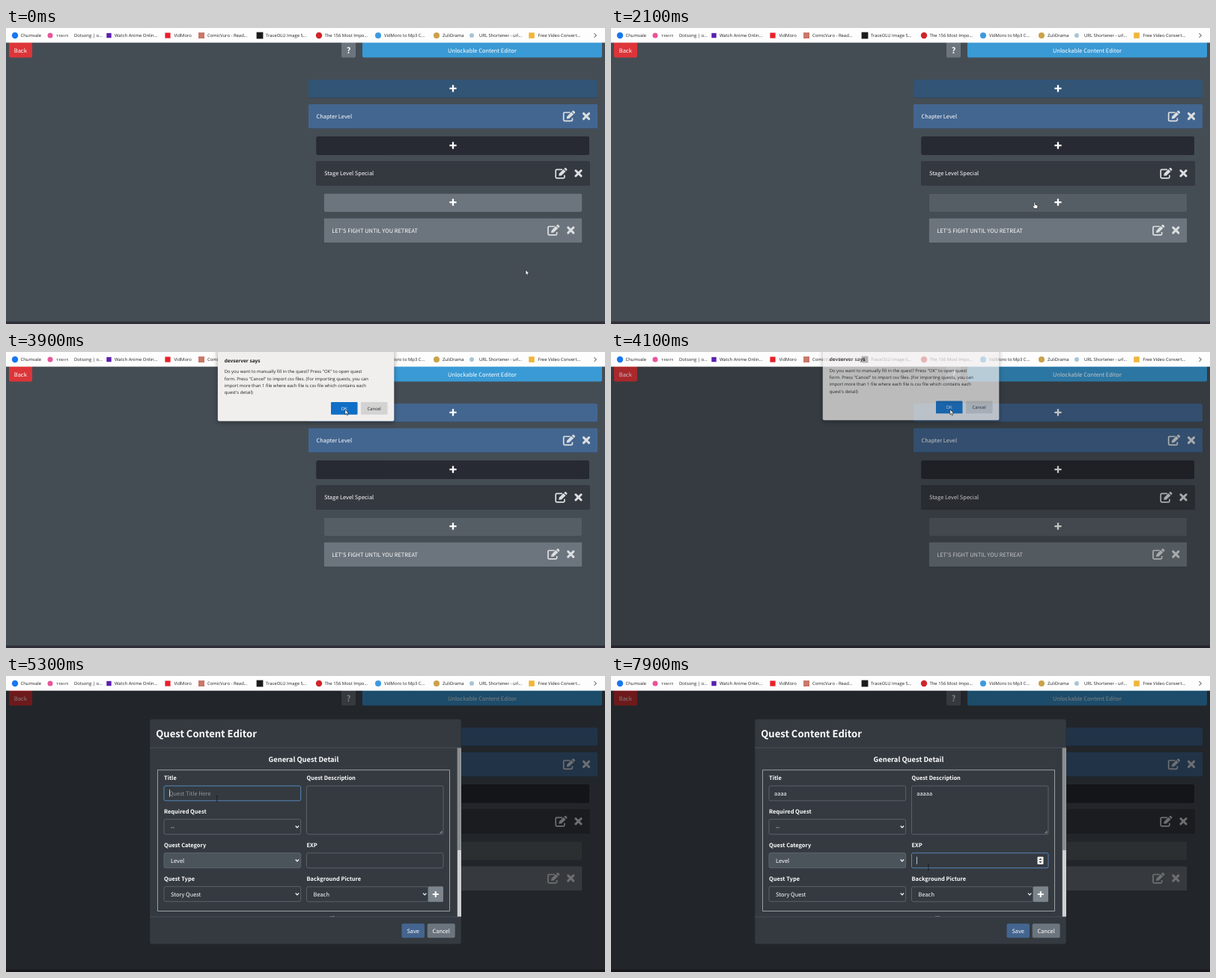
An HTML page for the animation above (8000 ms loop, 800x396 px).

```html
<!DOCTYPE html>
<html lang="en">
<head>
<meta charset="utf-8">
<title>Quest editor</title>
<style>
  html, body { margin: 0; width: 100%; height: 100%; overflow: hidden; background: #454d54; }
  svg { display: block; width: 100vw; height: 100vh; }
  text { font-family: "Noto Sans CJK JP", "Noto Sans CJK SC", sans-serif; fill: #fff; white-space: pre; text-rendering: geometricPrecision; }
  .ui text { font-family: "Open Sans", "Noto Sans", sans-serif; fill: #222; }
  .ui text.light { fill: #fff; }
  .b { font-weight: 700; }
  .mid { text-anchor: middle; }
  .hint { fill: #8e959b; }
  .card { filter: drop-shadow(0 .5px .7px rgba(0, 0, 0, .45)); }
  .field { stroke: #646b72; stroke-width: .8; }
  .line { fill: none; stroke: #fff; }
  #dialog { filter: drop-shadow(0 2px 3px rgba(0, 0, 0, .4)); }
  #cursor path { fill: #fff; stroke: #111; stroke-width: .6; stroke-linejoin: round; }
</style>
</head>
<body>
<svg id="stage" viewBox="0 0 800 396" preserveAspectRatio="none"></svg>
<script>
const LOOP = 8000, STEP = 100, BASE = 7.46;
const PANEL = '#343a40', GRAY = '#6c757d', BLUE = '#436690';

const box = (x, y, x2, y2, fill, attrs = '') =>
  `<rect x="${x}" y="${y}" width="${x2 - x}" height="${y2 - y}" fill="${fill}" ${attrs}/>`;
const text = (x, y, str, size = BASE, cls = '', attrs = '') =>
  `<text x="${x}" y="${y}" font-size="${size}" class="${cls}" ${attrs}>${str}</text>`;
const path = (d, attrs) => `<path d="${d}" ${attrs}/>`;
const at = (x, y, content) => `<g transform="translate(${x} ${y})">${content}</g>`;

// Page
const plus = (x, y, r = 4.6) =>
  path(`M${x - r} ${y}h${2 * r}M${x} ${y - r}v${2 * r}`, `class="line" stroke-width="${r / 2}"`);

const editIcon = (x, y) => at(x, y,
  path('M1.5-5H-6q-1.3 0-1.3 1.3V5.1q0 1.3 1.3 1.3H3.1q1.3 0 1.3-1.3V2.4', 'fill="none" stroke="#dcdfe1" stroke-width="1.7"') +
  path('M-3.2 3.4L-2.8.4 3-5.4 6-2.4.2 3zM3.7-6.1L4.9-7.2Q5.6-7.7 6.3-7.2L7.8-5.7Q8.4-5 7.8-4.3L6.7-3.1z', 'fill="#dcdfe1"'));

const crossIcon = (x, y) => at(x, y,
  path('M-3.6-3.6L3.6 3.6M3.6-3.6L-3.6 3.6', 'stroke="#dcdfe1" stroke-width="2.9" stroke-linecap="round"'));

const addButton = (id, x, y, x2, fill) =>
  box(x, y, x2, y + 24.5, fill, `id="${id}" rx="2" class="card"`) + plus(597, y + 11.8);

const header = (x, y, x2, fill, label) =>
  box(x, y, x2, y + 32.5, fill, 'rx="1" class="card"') + text(x + 10.5, y + 19, label) +
  editIcon(x2 - 38, y + 16) + crossIcon(x2 - 15, y + 16);

const page =
  box(0, 0, 800, 396, '#454d54') + box(0, 392.7, 800, 396, '#302f38') +
  box(4, 18, 35, 39.5, '#dd3539', 'rx="2"') + text(19.3, 33, 'Back', BASE, 'mid') +
  box(448, 18, 467, 39.5, GRAY, 'rx="2"') + text(457.6, 34.2, '?', 11, 'mid b') +
  box(476, 18, 796, 39.5, '#3a9ad5', 'rx="2"') + text(636, 33, 'Unlockable Content Editor', BASE, 'mid') +
  addButton('addChapter', 404, 69, 790, BLUE) +
  header(404, 102, 790, BLUE, 'Chapter Level') +
  addButton('addStage', 414.5, 145.3, 779, '#272a32') +
  header(414.5, 178.4, 779.5, '#34383f', 'Stage Level Special') +
  addButton('addQuest', 424.7, 221.4, 769.3, GRAY) +
  header(424.7, 254.5, 769.3, GRAY, "LET'S FIGHT UNTIL YOU RETREAT");

// Quest form
const field = (id, x, y, x2, y2, fill = PANEL) =>
  box(x, y, x2, y2, fill, `id="${id}" class="field" rx="2"`);
const label = (x, y, str) => text(x, y, str, BASE, 'b');
const select = (id, x, y, x2, value, fill) =>
  field(id, x, y, x2, y + 20, fill) + text(x + 9, y + 13, value) +
  path(`M${x2 - 7} ${y + 8.8}l2.2 2.3 2.2-2.3`, 'class="line" stroke-width="1.2"');

const L = 211, R = 401.5;
const modal =
  box(192, 57.7, 608, 358.8, PANEL, 'rx="3" stroke="#262a2e" stroke-width=".6"') +
  text(200.3, 81.6, 'Quest Content Editor', 13.06, 'b') +
  '<clipPath id="scroll"><rect x="192" y="96" width="416" height="226"/></clipPath><g clip-path="url(#scroll)">' +
  text(397.5, 114.8, 'General Quest Detail', 9.33, 'b mid') +
  box(202.6, 125.8, 592.5, 314.4, 'none', 'stroke="#b4b7ba" stroke-width=".8"') +
  label(L, 139.4, 'Title') + field('title', L, 147, 393.7, 166.8) +
  text(218, 159.7, 'Quest Title Here', BASE, 'hint', 'id="hint"') + text(218, 159.7, '', BASE, '', 'id="titleText"') +
  label(L, 184.4, 'Required Quest') + select('required', L, 191.7, 393.7, '--') +
  label(L, 229.4, 'Quest Category') + select('category', L, 236.7, 393.7, 'Level', '#4c545b') +
  label(L, 274.4, 'Quest Type') + select('type', L, 281.7, 393.7, 'Story Quest') +
  label(R, 139.4, 'Quest Description') + field('desc', R, 147, 584, 211.8) +
  text(408.2, 159.7, '', BASE, '', 'id="descText"') +
  path('M579.5 210.3l3-3M581.3 210.5l1.3-1.3', 'class="line" stroke-width=".6"') +
  label(R, 229.4, 'EXP') + field('exp', R, 236.8, 584, 256.8) +
  '<g id="spinner">' + box(569.5, 241.8, 577.5, 252, '#f0f0f0', 'rx="1"') +
  path('M571.5 246l2-2.2 2 2.2zM571.5 248l2 2.2 2-2.2z', 'fill="#444"') + '</g>' +
  label(R, 274.4, 'Background Picture') + select('picture', R, 281.9, 564, 'Beach') +
  box(563.8, 281.6, 584, 302.2, '#7d858c', 'rx="1.5"') + plus(573.8, 291.9, 4) +
  text(397.5, 328.6, 'Quest Item Payoff', 9.33, 'b mid') +
  box(602.8, 96, 608, 322, '#cfd0d1') + box(603, 96, 607.8, 233, '#8b8e90') + '</g>' +
  path('M192 96H608M192 322.2H608', 'class="line" style="stroke:#555c63" stroke-width=".6"') +
  box(528.5, 331.2, 559, 350.3, '#44658f', 'rx="2"') + text(543.7, 343.6, 'Save', BASE, 'mid') +
  box(562.7, 331.2, 599.7, 350.3, GRAY, 'rx="2"') + text(581.2, 343.6, 'Cancel', BASE, 'mid') +
  box(0, 0, .7, 10, '#fff', 'id="caret"');

// Bookmarks: icon x, half size, round?, colour, label x, label
const bookmarks = [
  [12, 4.2, 1, '#1877f2', 19.5, 'Chumvale'],
  [59, 3.5, 1, '#e8559a', 67.3, 'รายการ'],
  [137.5, 3.2, 0, '#5a1fb0', 145, 'Watch Anime Onlin...'],
  [216, 3.6, 0, '#e8202a', 224.5, 'VidMoro'],
  [261, 4, 0, '#c9786a', 269, 'ComicVuro - Read...'],
  [339, 4.4, 0, '#1b1b1b', 347, 'TraceOLU Image S...'],
  [418, 4.2, 1, '#d2232a', 425.5, 'The 156 Most Impo...'],
  [497, 4, 1, '#3b9ae1', 505, 'VidMoro to Mp3 C...'],
  [575, 4, 1, '#c9a24a', 583, 'ZuliDrama'],
  [622, 3, 1, '#a9c5d6', 632, 'URL Shortener - url...'],
  [702, 3.8, 0, '#f0b63c', 710.5, 'Free Video Convert...']
];
const bar = box(0, 0, 800, 19.6, '#fdfdfd') +
  bookmarks.map(([x, r, round, fill, tx, str]) =>
    box(x - r, 10 - r, x + r, 10 + r, fill, `rx="${round ? r : 0}"`) + text(tx, 12.4, str, 5.9)).join('') +
  text(91, 12.4, 'Dotsong | o...', 5.9) +
  path('M785.6 7.2l2.8 2.8-2.8 2.8', 'class="line" style="stroke:#222" stroke-width=".9"');

const message = [
  'Do you want to manually fill in the quest? Press "OK" to open quest',
  'form. Press "Cancel" to import csv files. (For importing quests, you can',
  'import more than 1 file where each file is csv file which contains each',
  "quest's detail)"
];
const dialog = box(282.8, -10, 518.3, 92.6, '#f1efee', 'rx="2"') +
  text(291.7, 13.8, 'devserver says', 6.5, 'b') +
  message.map((str, i) => text(291.7, 28.2 + i * 9.35, str, 5.9)).join('') +
  box(434, 67, 469.5, 83.8, '#0f6fc6', 'rx="1.2"') + text(451.5, 77.6, 'OK', 5.9, 'mid light') +
  box(474, 67, 509.5, 83.8, '#d3d3d3', 'rx="1.2"') + text(491.7, 77.6, 'Cancel', 5.9, 'mid');

const cursor =
  path('M0 0V7L1.6 5.5 2.7 8 3.8 7.5 2.7 5.1H4.9z', 'id="arrow"') +
  path('M-.9.6Q0-.6.9.6V3.3L3.2 3.9Q4.3 4.2 4.2 5.3L3.6 8.6H-.7L-2.8 5.2Q-2.4 4.1-1.4 4.9L-.9 5.4z', 'id="hand"') +
  path('M-1.1-3.6H1.1M0-3.6V3.6M-1.1 3.6H1.1', 'id="beam"');

const stage = document.getElementById('stage');
stage.innerHTML = page + box(0, 19.6, 800, 396, '#000', 'id="backdrop"') +
  `<g id="modal">${modal}</g><g class="ui">${bar}<g id="dialog">${dialog}</g></g><g id="cursor">${cursor}</g>`;

const parts = {};
stage.querySelectorAll('[id]').forEach(el => parts[el.id] = el);

// Pointer stops: time, x, y
const stops = [
  [800, 694, 323.5], [1200, 441.8, 231], [1700, 565.8, 233], [3000, 565.8, 233],
  [3700, 452.8, 76.8], [4500, 452.8, 76.8], [5100, 281.7, 164], [6000, 281.7, 164],
  [6400, 440, 170], [7100, 440, 170], [7500, 424, 255.5]
];
const ramp = (t, from, to) => Math.min(1, Math.max(0, (t - from) / (to - from)));

function pointer(t) {
  let [, x, y] = stops[0];
  for (let i = 1; i < stops.length; i++) {
    const k = ramp(t, stops[i - 1][0], stops[i][0]), s = k * k * (3 - 2 * k);
    x += (stops[i][1] - stops[i - 1][1]) * s;
    y += (stops[i][2] - stops[i - 1][2]) * s;
  }
  return [x, y];
}

const show = (el, on) => el.style.display = on ? '' : 'none';
const move = (el, x, y) => el.setAttribute('transform', `translate(${x} ${y})`);
const fade = (el, a) => { el.style.opacity = a; show(el, a > 0); };
const typed = (t, start, max) => Math.min(max, Math.max(0, Math.floor((t - start) / 100) + 1));

function drawForm(t) {
  const titleCount = typed(t, 5500, 4), descCount = typed(t, 6600, 5);
  parts.titleText.textContent = 'a'.repeat(titleCount);
  parts.descText.textContent = 'a'.repeat(descCount);
  show(parts.hint, !titleCount);

  const focus = t < 5200 ? '' : t < 6500 ? 'title' : t < 7600 ? 'desc' : 'exp';
  for (const id of ['title', 'desc', 'exp']) parts[id].style.stroke = id === focus ? '#639ad8' : '';
  show(parts.spinner, focus === 'exp');

  const [x, y, since] = {
    '': [0, 0, t],
    title: [218 + parts.titleText.getComputedTextLength(), 151.8, titleCount ? 5400 + titleCount * 100 : 5200],
    desc: [408.2 + parts.descText.getComputedTextLength(), 151.8, descCount ? 6500 + descCount * 100 : 6500],
    exp: [408.2, 241.8, 7600]
  }[focus];
  move(parts.caret, x, y);
  show(parts.caret, focus && (t - since) % 1000 < 500);
}

function draw(t) {
  parts.addChapter.style.fill = t < 2700 ? '#325475' : BLUE;
  parts.addQuest.style.fill = t < 1300 ? GRAY : '#565e65';

  const dialogAlpha = ramp(t, 2700, 2930) * (1 - ramp(t, 4060, 4200));
  fade(parts.dialog, dialogAlpha);
  move(parts.dialog, 0, -5 * (1 - dialogAlpha));

  fade(parts.backdrop, .5 * ramp(t, 4030, 4180));
  fade(parts.modal, ramp(t, 4220, 4370));
  move(parts.modal, 0, -21 * (1 - ramp(t, 4220, 4520)) ** 1.62);
  drawForm(t);

  const shape = t >= 5000 ? 'beam' : t >= 1300 && t < 3100 ? 'hand' : 'arrow';
  for (const id of ['arrow', 'hand', 'beam']) show(parts[id], id === shape);
  move(parts.cursor, ...pointer(t));
}

function tick() {
  draw(Math.floor(performance.now() % LOOP / STEP) * STEP);
  requestAnimationFrame(tick);
}
tick();
</script>
</body>
</html>
```
